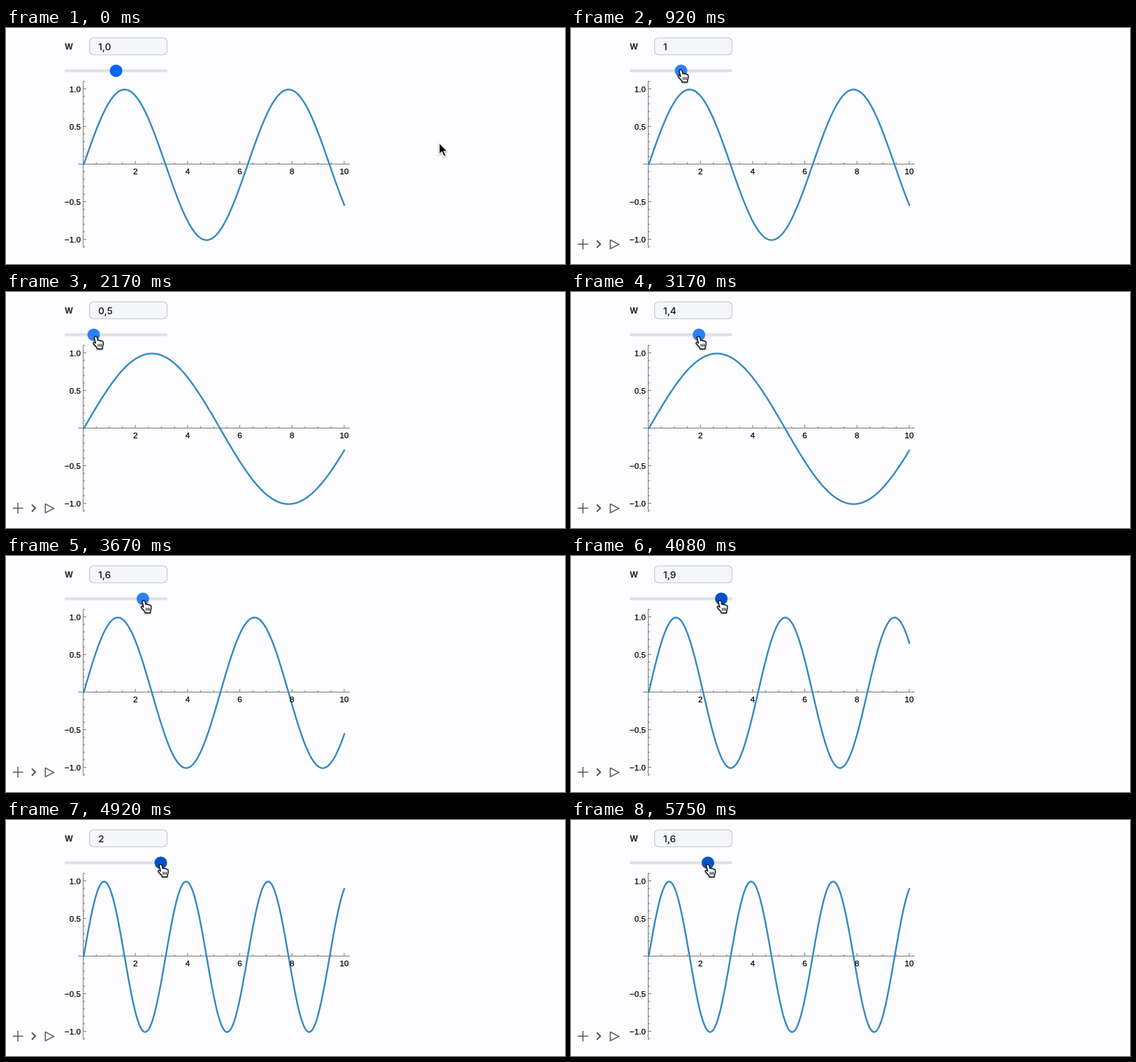
An HTML page that plays this animation: 800 by 339 pixels, repeating every 5830 ms.

```html
<!DOCTYPE html>
<html lang="en">
<head>
<meta charset="utf-8">
<title>Sine wave with a frequency slider</title>
<style>
  html, body { margin: 0; width: 100%; height: 100%; overflow: hidden; background: #fdfcff; }
  svg { display: block; width: 100vw; height: 100vh; }
  .axis { fill: none; stroke: #777; stroke-width: 1; }
  .label { font: 11.7px "Liberation Sans", Arial, sans-serif; fill: #000; stroke: #000; stroke-width: .25; }
  .name { font: 700 11.6px Inter, sans-serif; fill: #222; }
  .value { font: 500 13.7px Inter, sans-serif; fill: #111; }
  .icons { fill: none; stroke: #555; stroke-width: 1.5; }
  .shadow { filter: drop-shadow(0 1px 1px rgba(0, 0, 0, .35)); }
</style>
</head>
<body>
<svg viewBox="0 0 800 339">
  <text class="name" x="84" y="31">W</text>
  <rect x="119.5" y="14" width="111" height="24.5" rx="6" fill="#f4f6fa" stroke="#c6c9cd" stroke-width="1.2"/>
  <text class="value" id="value" x="132" y="31.5"></text>
  <rect x="84" y="59.3" width="147" height="4.2" rx="2.1" fill="#dfe2e4"/>
  <circle id="knob" cy="61.4" r="9"/>

  <path class="axis" id="axes"/>
  <path id="curve" fill="none" stroke="#3089c6" stroke-width="2.4" stroke-linejoin="round"/>
  <g class="label" id="labels"></g>

  <g class="icons" id="icons">
    <path d="M9.5 310.5H24.5M17 303V318"/>
    <path d="M37 305.5L42 310.5L37 315.5" stroke-width="2"/>
    <path d="M56.3 304.4L68.6 310.8L56.3 317.2Z" stroke-linejoin="round"/>
  </g>

  <g class="shadow" id="arrow">
    <path d="M0 0V16.5L3.8 13L6.6 19.6L9.6 18.4L6.8 12H11.7Z" fill="#000" stroke="#fff" stroke-width="1.2"/>
  </g>
  <g class="shadow" id="hand">
    <g transform="translate(-4.2 -1.2)" fill="#fff" stroke="#111" stroke-width="1.4" stroke-linejoin="round">
      <path d="M4.2 1.2C5.6 .6 6.6 1.4 7 2.8L8.2 7C9 6.2 10.4 6.3 10.8 7.4C11.6 6.7 13 6.9 13.4 8C14.6 7.6 15.7 8.2 15.8 9.8C16 12 15.8 14 14.6 16.2V19H7.2L6.8 17C5 15.4 3.4 13.2 1.8 11.4C.8 10.2 2 8.8 3.4 9.6L5 10.8L3 3.4C2.7 2.4 3.2 1.6 4.2 1.2Z"/>
      <path d="M8.6 11.8V15.8M10.9 11.8V15.8M13.1 11.8V15.8" stroke-width="1.1"/>
    </g>
  </g>
</svg>
<script>
const LOOP = 5830, FPS = 12;
const el = Object.fromEntries(
  [...document.querySelectorAll("[id]")].map(node => [node.id, node]));

const plotX = x => 110.5 + 37.35 * x;
const plotY = y => 195.5 - 108.1 * y;
const knobX = w => 93.5 + 64 * w;

const ramp = (t, from, to) => Math.min(1, Math.max(0, (t - from) / (to - from)));
const tenth = v => Math.round(v * 10) / 10;
const show = (node, on) => node.setAttribute("visibility", on ? "visible" : "hidden");

// Drag left, quickly right, slowly to the end, then back.
const sliderAt = t => 1
  - .5 * ramp(t, 900, 2300)
  + .9 * ramp(t, 2700, 3170)
  + .6 * ramp(t, 3300, 4300)
  - .4 * ramp(t, 5420, 5750);

// The plot catches up with the slider late.
const frequencyAt = t => 1
  - .4 * ramp(t, 1600, 2170)
  + .6 * ramp(t, 3170, 3670)
  + .8 * ramp(t, 3670, 4950);

// An arc up and over to the knob, which the cursor then holds.
function cursorAt(t) {
  const p = ramp(t, 80, 750);
  const gripX = knobX(sliderAt(t)) - 1;
  const gripY = 60 + 4 * ramp(t, 1580, 2170);
  return [620 + (gripX - 620) * p, 165 + (gripY - 165) * p - 100 * Math.sin(Math.PI * p)];
}

function addLabel(text, x, y, anchor) {
  const node = document.createElementNS("http://www.w3.org/2000/svg", "text");
  node.textContent = text;
  node.setAttribute("x", x);
  node.setAttribute("y", y);
  node.setAttribute("text-anchor", anchor);
  el.labels.append(node);
}

function buildAxes() {
  let d = "M103 195.5H492M110.5 76V315.5";
  for (let i = 1; i <= 20; i++) {
    d += `M${plotX(i / 2)} 195.5v${i % 4 ? -2.5 : -4.5}`;
    if (i % 4 === 0) addLabel(i / 2, plotX(i / 2), 210, "middle");
  }
  for (let i = -11; i <= 11; i++) {
    d += `M110.5 ${plotY(i / 10)}h${i % 5 ? 2.5 : 4.5}`;
    if (i && i % 5 === 0) {
      addLabel((i / 10).toFixed(1).replace("-", "\u2212"), 107, plotY(i / 10) + 4.4, "end");
    }
  }
  el.axes.setAttribute("d", d);
}

function drawCurve(w) {
  const points = Array.from({ length: 251 }, (_, i) => {
    const x = i / 25;
    return `${(plotX(x) + .6).toFixed(2)} ${(plotY(Math.sin(w * x)) + 1).toFixed(2)}`;
  });
  el.curve.setAttribute("d", "M" + points.join("L"));
}

function draw(now) {
  const t = Math.floor((now % LOOP + 5) * FPS / 1000) * 1000 / FPS;
  const w = tenth(sliderAt(t));
  const hovering = t >= 700, pressed = t >= 4080;

  el.value.textContent = t < 900 ? "1,0" : String(w).replace(".", ",");
  el.knob.setAttribute("cx", knobX(w));
  el.knob.setAttribute("fill", pressed ? "#0052c8" : hovering ? "#2b80fc" : "#0067ff");
  drawCurve(tenth(frequencyAt(t)));

  const place = `translate(${cursorAt(t).join(" ")})`;
  for (const cursor of [el.arrow, el.hand]) cursor.setAttribute("transform", place);
  show(el.arrow, !hovering);
  show(el.hand, hovering);
  show(el.icons, t >= 660);
}

const start = performance.now();
function tick() {
  draw(performance.now() - start);
  requestAnimationFrame(tick);
}

buildAxes();
tick();
</script>
</body>
</html>
```
